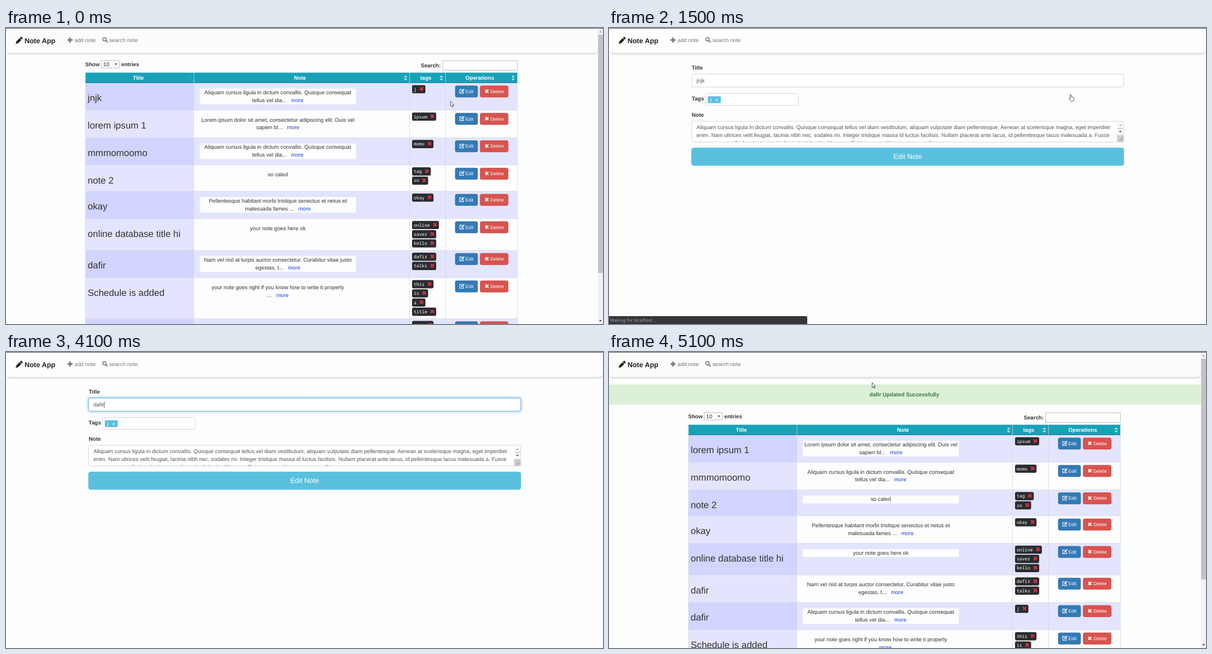
An HTML page with a canvas that plays this animation: 1063 px wide and 527 px high, repeating every 5200 ms.

```html
<!DOCTYPE html>
<html lang="en">
<head>
<meta charset="utf-8">
<title>Note App</title>
<style>
html, body { margin: 0; width: 100%; height: 100%; overflow: hidden; background: #fdfdfd; }
canvas { display: block; }
</style>
</head>
<body>
<canvas id="stage" width="1063" height="527"></canvas>
<script>
const W = 1063, H = 527, LOOP = 5200;
const ctx = document.getElementById('stage').getContext('2d');
ctx.textRendering = 'geometricPrecision';

const SANS = '"Liberation Sans", Arial, sans-serif';
const BODY = `9.69px ${SANS}`, BOLD = `bold ${BODY}`;
const TITLE = `16.61px ${SANS}`, SMALL = `8.3px ${SANS}`, LARGE = `12.46px ${SANS}`;
const MONO = '7.99px "Noto Sans Mono", monospace';
const STATUS = '7.9px "Open Sans", sans-serif';
const INK = '#333', LINK = '#1443dc';

const jnjk = ['jnjk', 'Aliquam cursus ligula in dictum convallis. Quisque consequat', 'tellus vel dia...', ['j']];
const rows = [
  jnjk,
  ['lorem ipsum 1', 'Lorem ipsum dolor sit amet, consectetur adipiscing elit. Duis vel', 'sapien bl...', ['ipsum']],
  ['mmmomoomo', jnjk[1], jnjk[2], ['momo']],
  ['note 2', 'so caled', '', ['tag', 'so']],
  ['okay', 'Pellentesque habitant morbi tristique senectus et netus et', 'malesuada fames ...', ['okay']],
  ['online database title hi', 'your note goes here ok', '', ['online', 'saver', 'kello']],
  ['dafir', 'Nam vel nisl at turpis auctor consectetur. Curabitur vitae justo', 'egestas, t...', ['dafir', 'talks']],
  ['Schedule is added', 'your note goes right if you know how to write it properly', '...', ['this', 'is', 'a', 'title']],
  ['test note', 'your note goes here', '', ['test']]
];
const updatedRows = [...rows.slice(1, 7), ['dafir', ...jnjk.slice(1)], ...rows.slice(7)];

const noteText = [
  'Aliquam cursus ligula in dictum convallis. Quisque consequat tellus vel diam vestibulum, aliquam vulputate diam pellentesque. Aenean at scelerisque magna, eget imperdiet',
  'enim. Nam ultrices velit feugiat, lacinia nibh nec, sodales mi. Integer tristique massa id luctus facilisis. Nullam placerat ante lacus, id pellentesque lacus malesuada a. Fusce',
  'ut ornare nunc. Sed molestie turpis dignissim lobortis. Aliquam efficitur eros sed lorem ornare mollis.'
];

const typing = [[0, 'jnjk'], [2200, 'jnj'], [2300, 'jn'], [2500, 'j'], [2600, ''],
  [3400, 'd'], [3600, 'da'], [3800, 'daf'], [4000, 'dafi'], [4100, 'dafir']];
const pointerPath = [[4600, [237, 206]], [4700, [206, 236]], [4800, [183, 258]],
  [5000, [502, 130]], [5100, [468, 54]]];
const valueAt = (steps, t) => steps.filter(([start]) => start <= t).pop()[1];

function text(str, x, y, color = INK, font = BODY, align = 'left') {
  ctx.font = font;
  ctx.fillStyle = color;
  ctx.textAlign = align;
  ctx.fillText(str, x, y);
}

function rect(x, y, w, h, fill) {
  ctx.fillStyle = fill;
  ctx.fillRect(x, y, w, h);
}

function box(x, y, w, h, radius, fill, border, lineWidth = 0.8) {
  ctx.beginPath();
  ctx.roundRect(x, y, w, h, radius);
  ctx.fillStyle = fill;
  ctx.fill();
  if (border) {
    ctx.strokeStyle = border;
    ctx.lineWidth = lineWidth;
    ctx.stroke();
  }
}

function line(points, color, width) {
  ctx.beginPath();
  points.forEach(([x, y]) => ctx.lineTo(x, y));
  ctx.strokeStyle = color;
  ctx.lineWidth = width;
  ctx.stroke();
}

function polygon(points, fill) {
  ctx.beginPath();
  points.forEach(([x, y]) => ctx.lineTo(x, y));
  ctx.closePath();
  ctx.fillStyle = fill;
  ctx.fill();
}

// A triangle around (x, y); a negative height points down.
const triangle = (x, y, w, h, fill) =>
  polygon([[x - w / 2, y + h / 2], [x, y - h / 2], [x + w / 2, y + h / 2]], fill);

function cross(x, y, r, color) {
  line([[x - r, y - r], [x + r, y + r]], color, 2.2);
  line([[x - r, y + r], [x + r, y - r]], color, 2.2);
}

function pencil(x, y, scale, color) {
  ctx.save();
  ctx.translate(x, y);
  ctx.rotate(-Math.PI / 4);
  ctx.scale(scale, scale);
  polygon([[0, 0], [4, -2.2], [12, -2.2], [12, 2.2], [4, 2.2]], color);
  rect(12.8, -2.2, 3, 4.4, color);
  ctx.restore();
}

function navbar(width, fill) {
  box(0, -20, width, 68, [0, 0, 8, 8], '#e6e7e7');
  box(0, -20, width, 64, [0, 0, 8, 4], fill);
  pencil(17.2, 28.2, 1.02, '#222');
  text('Note App', 33, 27, '#222', `bold ${LARGE}`);
  rect(109.5, 20, 9, 2.8, '#777');
  rect(112.6, 17, 2.8, 9, '#777');
  text('add note', 122, 25, '#777');
  ctx.beginPath();
  ctx.arc(175.4, 20, 3.1, 0, 7);
  ctx.strokeStyle = '#777';
  ctx.lineWidth = 1.5;
  ctx.stroke();
  line([[177.6, 22.2], [181, 25.6]], '#777', 2);
  text('search note', 184, 25, '#777');
}

function scrollbar(thumbEnd) {
  rect(1054, 1, 9, H, '#f1f1f1');
  rect(1054.3, 12, 8.5, thumbEnd - 12, '#c1c1c1');
  triangle(1058.5, 6.5, 5, 2.8, '#a3a3a3');
  triangle(1058.5, 521.5, 5, -2.8, '#505050');
}

function operations(y, active) {
  if (active) box(798.5, y + 3.7, 43, 23.6, 3.5, '#9cc4e8');
  box(800, y + 5.2, 39.7, 20.2, 2.5, active ? '#235682' : '#337ab7', active ? '#1b4468' : '#2e6da4');
  box(844.3, y + 5.2, 49.7, 20.2, 2.5, '#d9534f', '#d43f3a');
  line([[812.5, y + 11.6], [808, y + 11.6], [808, y + 18.4], [814.6, y + 18.4], [814.6, y + 15.6]], '#fff', 1.1);
  pencil(810.3, y + 16.6, 0.5, '#fff');
  text('Edit', 818, y + 18.1, '#fff', SMALL);
  cross(856.2, y + 14.8, 2.6, '#fff');
  text('Delete', 862.3, y + 18.1, '#fff', SMALL);
}

function tag(label, y) {
  const end = 735 + 4.8 * label.length;
  box(723, y, end + 7 - 723, 14.6, 2.8, '#2a2c30');
  text(label, 726, y + 10, '#fff', MONO);
  cross(end, y + 6.7, 2.8, '#e0333f');
}

function noteCell(first, second, y) {
  rect(345, y + 10.3, 278, second ? 27.7 : 13.9, '#fdfdfd');
  text(first, 484, y + 20, INK, BODY, 'center');
  if (!second) return;
  const lead = second + '\u00a0\u00a0 ';
  ctx.font = BODY;
  const left = 484 - ctx.measureText(lead + 'more').width / 2;
  text(lead, left, y + 33.9);
  text('more', left + ctx.measureText(lead).width, y + 33.9, LINK);
}

function tableRow([title, first, second, tags], index, y, height, active) {
  const odd = index % 2 === 0;
  rect(141.5, y, 193, height, odd ? '#d2d5ff' : '#e3e5ff');
  rect(334.5, y, 576, height, odd ? '#e3e5ff' : '#fdfdfd');
  rect(141.5, y - 0.4, 769, 0.7, '#d8dae2');
  text(title, 145.5, y + 32.4, INK, TITLE);
  noteCell(first, second, y);
  tags.forEach((label, i) => tag(label, y + 4 + 16.35 * i));
  operations(y, active);
}

function listPage(list, offset, thumbEnd, active) {
  rect(0, 0, W, H, '#fcfdfd');
  navbar(1054, '#fbfcfc');
  scrollbar(thumbEnd);
  ctx.save();
  ctx.translate(0, offset);

  text('Show', 141, 67.8, INK, BOLD);
  box(169.5, 58, 32.5, 13, 0, '#fff', '#a9a9a9');
  text('10', 173, 67.8, '#222');
  triangle(195.7, 64.7, 3.6, -3.4, '#333');
  text('entries', 205.3, 67.8, INK, BOLD);
  text('Search:', 774, 70, INK, BOLD, 'right');
  box(777.4, 58.2, 133.2, 17, 0, '#fff', '#b0b0b0');

  let y = 97.7;
  list.forEach((row, i) => {
    const height = Math.max(row[3].length * 16.3 + 7.6, row[2] ? 48.8 : 46.6);
    tableRow(row, i, y, height, active && i === 0);
    y += height;
  });

  rect(141, 79.5, 770, 18, '#17a2b8');
  rect(141, 97, 770, 0.8, '#0f5f6d');
  [141.4, 334.4, 718.4, 782.4, 910.4].forEach(x => rect(x - 0.4, 79.5, 0.8, y - 79.5, '#d4d7de'));
  [['Title', 235.5], ['Note', 523.5], ['tags', 747.5], ['Operations', 843.5]]
    .forEach(([label, x]) => text(label, x, 91.6, '#fff', BOLD, 'center'));
  triangle(327.3, 86.3, 4.5, 3, '#5b9fc4');
  [711.5, 775.2, 903].forEach(x => {
    triangle(x, 86, 6, 3.8, '#c3dfe6');
    triangle(x, 91.8, 6, -3.8, '#c3dfe6');
  });
  ctx.restore();
}

function alertBar() {
  box(0, 57.8, 1053.5, 36, 2.5, '#dcefd7');
  text('dafir Updated Successfully', 525.8, 78.8, '#3c763d', BOLD, 'center');
}

function editPage(title, focused, caret) {
  rect(0, 0, W, H, '#fdfdfd');
  navbar(W, '#fefefe');
  text('Title', 147.3, 74.4, INK, BOLD);
  if (focused) {
    ctx.save();
    ctx.shadowColor = 'rgba(102,175,233,.7)';
    ctx.shadowBlur = 5;
    box(147, 82, 769.6, 23.2, 2.8, '#fff', '#66afe9', 1);
    ctx.restore();
  }
  box(147, 82, 769.6, 23.2, 2.8, '#fff', focused ? '#66afe9' : '#ccc');
  text(title, 155.7, 96.8, '#555');
  if (caret) rect(155.8 + ctx.measureText(title).width, 88.3, 0.8, 11, '#333');

  text('Tags', 147.3, 129.4, INK, BOLD);
  box(171.7, 116.4, 165.6, 21.2, 2.8, '#fff', '#ccc');
  box(176, 121.4, 23.2, 12.4, 1.8, '#5bc0de');
  text('j', 180.5, 130, '#fff', `bold 7.3px ${SANS}`);
  text('x', 189.6, 130, '#fff', `bold 7.3px ${SANS}`);

  text('Note', 147.3, 158.4, INK, BOLD);
  box(147, 166, 769.6, 37, 2.8, '#fff', '#ccc');
  ctx.save();
  ctx.beginPath();
  ctx.rect(147, 166.5, 757, 36);
  ctx.clip();
  noteText.forEach((str, i) => text(str, 155.7, 180.3 + 13.85 * i, '#555'));
  ctx.restore();
  rect(904.8, 166.6, 11.4, 24, '#f8f8f8');
  triangle(910.5, 172.8, 5, 2.8, '#a3a3a3');
  rect(906, 178, 9, 1.6, '#c1c1c1');
  triangle(910.5, 184.4, 5, -2.8, '#505050');
  rect(904.6, 190.6, 11.8, 12, '#cdcdcd');
  line([[908, 201], [914.5, 194.5]], '#808080', 0.8);
  line([[911.5, 201], [914.5, 198]], '#808080', 0.8);

  box(147, 213.6, 769.6, 31.2, 4.1, '#5bc0de', '#46b8da');
  text('Edit Note', 531.8, 233.3, '#fff', LARGE, 'center');
}

function spinnerPage() {
  rect(0, 0, W, H, '#fefefe');
  const arc = (from, to, color) => {
    ctx.beginPath();
    ctx.arc(531.8, 264.2, 20.4, from, to);
    ctx.strokeStyle = color;
    ctx.lineWidth = 8.4;
    ctx.stroke();
  };
  arc(0, 2 * Math.PI, '#f3f3f3');
  arc(-2.25, -0.68, '#444');
}

function statusBar(str, width, alpha = 1) {
  ctx.globalAlpha = alpha;
  box(0, 513, width, 20, [0, 2.8, 0, 0], '#35363a');
  ctx.globalAlpha = 1;
  text(str, 2, 523, '#a9adb3', STATUS);
}
const waiting = alpha => statusBar('Waiting for localhost...', 353, alpha);

function drawPointer(path, x, y) {
  ctx.save();
  ctx.translate(x, y);
  const shape = new Path2D(path);
  ctx.fillStyle = '#fff';
  ctx.strokeStyle = '#333';
  ctx.lineWidth = 0.8;
  ctx.lineJoin = 'round';
  ctx.fill(shape);
  ctx.stroke(shape);
  ctx.restore();
}
const arrow = (x, y) =>
  drawPointer('M.5.5V9.3L2.5 7.4 4 10.8 5.4 10.2 3.9 6.9H6.6Z', x, y);
const hand = () =>
  drawPointer('M2.2 1Q3.2-.2 4 1V4.6Q5 4 5.7 5Q6.7 4.5 7.3 5.4Q8.6 5 8.9 6.2V8.6L7.9 12.2H3.4L.4 8.2Q-.3 6.6 1 6.6L2.2 7.6Z', 819, 118);

function ellipse() {
  ctx.beginPath();
  ctx.ellipse(846.6, 113, 63.8, 33.8, 0, 0, 7);
  ctx.strokeStyle = '#e01e20';
  ctx.lineWidth = 2.4;
  ctx.stroke();
}

function draw(t) {
  if (t < 1400) {
    const hovering = t >= 300;
    listPage(rows, 0, 436, hovering);
    if (hovering) statusBar('localhost:8080/edit/5e9d584018947433147a2000', 188);
    if (t >= 400) ellipse();
    hovering ? hand() : arrow(791, 130);
  } else if (t < 1500) {
    spinnerPage();
    waiting();
    hand();
  } else if (t < 4600) {
    const focused = t >= 1700;
    editPage(valueAt(typing, t), focused, focused && !(t >= 3100 && t < 3400));
    if (t < 1800) waiting();
    if (!focused) hand();
  } else {
    listPage(updatedRows, 50, 405, false);
    alertBar();
    if (t < 4700) waiting(0.85);
    arrow(...valueAt(pointerPath, t));
  }
  rect(0, 0, W, 1, '#5a5a5a');
}

function frame() {
  draw(performance.now() % LOOP);
  requestAnimationFrame(frame);
}
frame();
</script>
</body>
</html>
```
